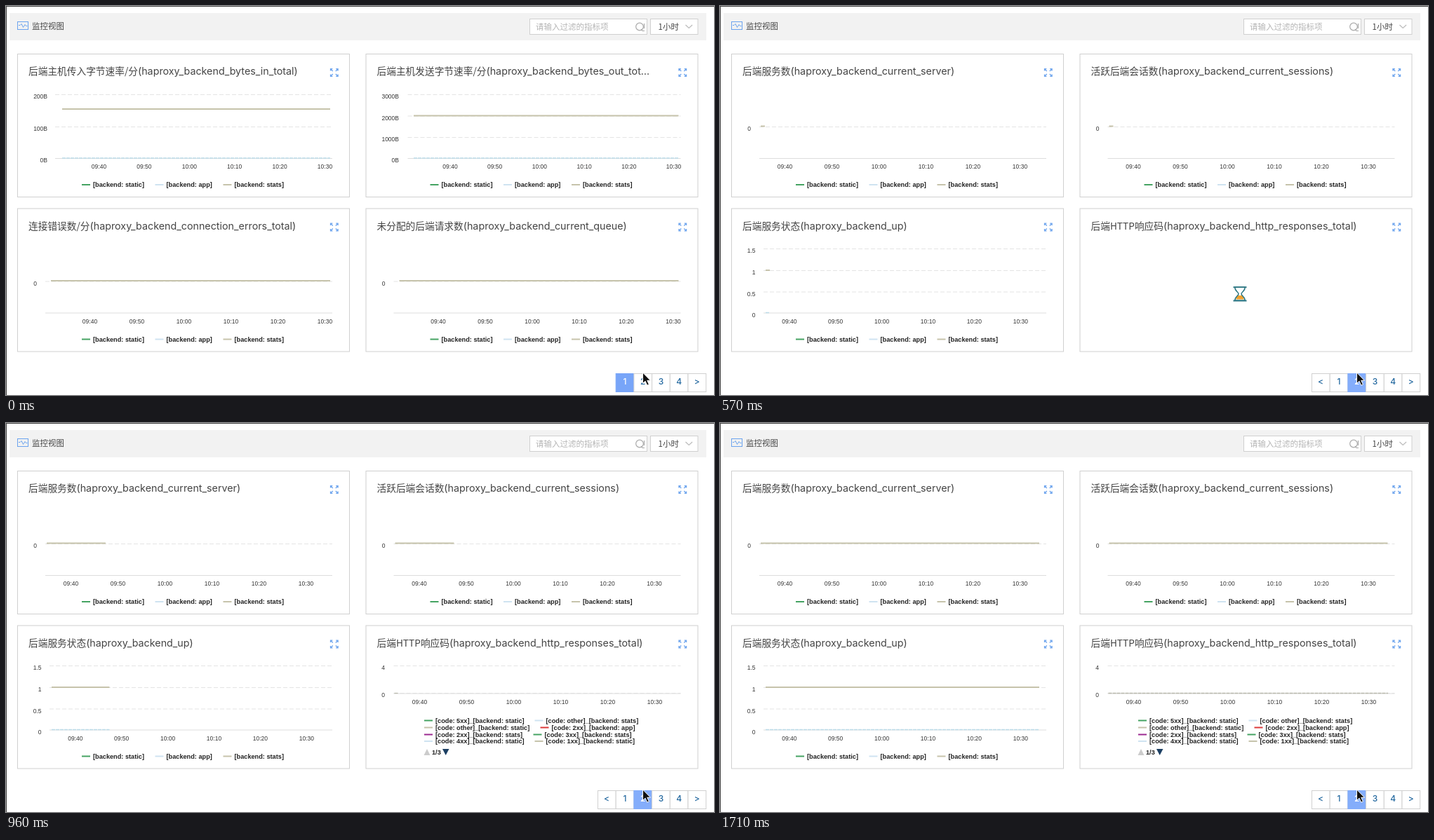
An HTML page that plays this animation: 1009 by 555 pixels, repeating every 1.83 s.

```html
<!DOCTYPE html>
<html lang="zh">
<head>
<meta charset="utf-8">
<style>
html, body { margin: 0; width: 100%; height: 100%; overflow: hidden; background: #fff; }
svg { display: block; }
text { font: 11.5px "Noto Sans CJK SC", "Noto Sans CJK", sans-serif; fill: #444; white-space: pre; }
.title { font-size: 13.7px; }
.metric { font: 14.3px Inter, sans-serif; }
.tick { font: 8.5px "Liberation Sans", Arial, sans-serif; fill: #333; }
.key { font: bold 9.2px "Liberation Sans", Arial, sans-serif; fill: #222; }
.nav { font: 500 12px Inter, sans-serif; fill: #23689f; text-anchor: middle; }
.mid { text-anchor: middle; }
.end { text-anchor: end; }
</style>
</head>
<body>
<svg id="stage" width="1009" height="555" viewBox="0 0 1009 555"></svg>
<script>
const LOOP = 1830, STEP = 30;
const GREEN = '#45a362', SKY = '#cfe3f1', TAN = '#c6c3ab', RED = '#dd3b3b', PURPLE = '#9c2a91';
const SHIFT_X = 496.5, SHIFT_Y = 220.5;

const text = (x, y, s, cls = '', extra = '') => `<text x="${x}" y="${y}" class="${cls}" ${extra}>${s}</text>`;
const line = (x1, x2, y, color, w = 1, extra = '') =>
  `<path d="M${x1} ${y}H${x2}" stroke="${color}" stroke-width="${w}" ${extra}/>`;
const box = (x, y, w, h, fill = '#fff', stroke = '#d0d0d0') =>
  `<rect x="${x}" y="${y}" width="${w}" height="${h}" fill="${fill}" stroke="${stroke}"/>`;
const key = (x, y, color, s) => line(x, x + 12, y, color, 2) + text(x + 16, y + 3.3, s, 'key');
const at = (i, s) => `<g transform="translate(${i % 2 * SHIFT_X} ${(i >> 1) * SHIFT_Y})">${s}</g>`;
const heading = s => text(32, 98, s.replace(/\(.*/, '<tspan class="metric">$&</tspan>'), 'title');

const backends = key(108, 255, GREEN, '[backend: static]') +
  key(212.5, 255, SKY, '[backend: app]') + key(309.5, 255, TAN, '[backend: stats]');

const codes = [
  [99.5, 204, GREEN, '5xx', 'static'], [257, 204, SKY, 'other', 'stats'],
  [99.5, 214, TAN, 'other', 'static'], [265, 214, RED, '2xx', 'app'],
  [99.5, 224, PURPLE, '2xx', 'stats'], [255, 224, GREEN, '3xx', 'stats'],
  [99.5, 233.5, SKY, '4xx', 'static'], [257, 233.5, TAN, '1xx', 'static']
].map(([x, y, c, code, name]) => key(x, y, c, `[code: ${code}]_[backend: ${name}]`)).join('') +
  '<path d="M99 253.5l4.5-9 4.5 9z" fill="#ccc"/>' + text(110.5, 252, '1/3', 'key') +
  '<path d="M125.5 244.5h9.5l-4.8 9z" fill="#1c3f63"/>';

// Axis, grid, series and legend of one chart, in the coordinates of the first panel
function chart(c) {
  const { left, right, ys, first, step, from, to, rows, bottom = 217.5, legend = backends } = c;
  let s = ys.map(([label, y]) => text(right, y + 5.5, label, 'tick end') +
    (y < bottom ? line(left, 465, y, '#e4e4e4', 1, 'stroke-dasharray="6 3"') : '')).join('');
  s += line(left, 465, bottom, '#ddd');
  ['09:40', '09:50', '10:00', '10:10', '10:20', '10:30'].forEach((h, i) =>
    s += text(first + i * step, bottom + 14.5, h, 'tick mid'));
  for (const [y, color, w, dash] of rows)
    s += line(from, to, y, color, w, `class="series" ${dash ? 'stroke-dasharray="5 1"' : ''}`);
  return s + legend;
}

const zeroRow = [[217, '#bcdce9', 1.5, true]];
const single = (first, from, to) => ({ left: 56, right: 44, ys: [['0', 172.5]], first, step: 67,
  from, to, rows: [[171.5, TAN, 2]] });

const pages = [[
  ['后端主机传入字节速率/分(haproxy_backend_bytes_in_total)', { left: 70, right: 59,
    ys: [['200B', 126.5], ['100B', 172.5], ['0B', 217.5]], first: 132.5, step: 64.4,
    from: 80, to: 462, rows: [...zeroRow, [147, TAN, 2]] }],
  ['后端主机发送字节速率/分(haproxy_backend_bytes_out_tot…', { left: 76, right: 63.5,
    ys: [['3000B', 126.5], ['2000B', 157], ['1000B', 187.5], ['0B', 217.5]], first: 136.5, step: 63.7,
    from: 84.5, to: 462, rows: [...zeroRow, [156.5, TAN, 2]] }],
  ['连接错误数/分(haproxy_backend_connection_errors_total)', single(119.5, 64, 462)],
  ['未分配的后端请求数(haproxy_backend_current_queue)', single(119.5, 64, 462)]
], [
  ['后端服务数(haproxy_backend_current_server)', single(92.5, 58, 455)],
  ['活跃后端会话数(haproxy_backend_current_sessions)', single(92.5, 58, 455)],
  ['后端服务状态(haproxy_backend_up)', { left: 62, right: 50.5,
    ys: [['1.5', 126], ['1', 157], ['0.5', 187.5], ['0', 217.5]], first: 98.8, step: 65.9,
    from: 65, to: 455, rows: [...zeroRow, [156.5, TAN, 2]] }],
  ['后端HTTP响应码(haproxy_backend_http_responses_total)', { left: 56, right: 43.5,
    ys: [['4', 126], ['0', 165]], first: 93, step: 67, bottom: 165.5,
    from: 57, to: 455.5, rows: [[165, '#b9b9ad', 1.3, true]], legend: codes }]
]];

const glass = 'M-7.2-9.5C-7.2-3.5-2-3-2 0S-7.2 3.5-7.2 9.5H7.2C7.2 3.5 2 3 2 0S7.2-3.5 7.2-9.5Z';
const hourglass = `<g class="wait" transform="translate(244.5 190.3)"><g class="turn">
  <g clip-path="url(#bulb)" fill="#f0a12e"><rect class="top" x="-5.5" width="11"/><rect class="low" x="-5.5" width="11"/></g>
  <path d="${glass}" fill="none" stroke="#2d7783" stroke-width="1.5"/>
  <path d="M-9.5-9.7H9.5M-9.5 9.7H9.5" stroke="#2d7783" stroke-width="1.8"/></g></g>`;

const arm = a => `<path d="M2 2L5 5M2.4 5.3H5.3V2.4" transform="rotate(${a})"/>`;
const expand = `<g transform="translate(467.8 95)" fill="none" stroke="#70a6ee" stroke-width="1.3">${[0, 90, 180, 270].map(arm).join('')}</g>`;

const page = (list, p) => `<g id="page${p}">` + list.map(([title, c], i) =>
  at(i, heading(title) + `<g class="chart">${chart(c)}</g>` + (p ? hourglass : ''))).join('') +
  (p ? box(843.5, 524.5, 25.7, 26) + text(856, 539.7, '&lt;', 'nav') : '') +
  ['1', '2', '3', '4', '&gt;'].map((s, i) => {
    const x = 869.2 + i * 25.7, on = i === p, blue = p ? '#84adfb' : '#78a5f8';
    return box(x, 524.5, 25.7, 26, on ? blue : '#fff', on ? blue : '#d0d0d0') +
      text(x + 12.8, 539.7, s, 'nav', on ? 'style="fill:#fff"' : '');
  }).join('') + '</g>';

stage.innerHTML = `<defs><clipPath id="bulb"><path d="${glass}"/></clipPath></defs>
  <path d="M0 .5H1009M.5 0V555" stroke="#444"/>
  <rect x="5" y="10" width="993" height="39" fill="#f2f2f2"/>
  <g fill="none" stroke="#6ba3ee"><rect x="16.5" y="22.5" width="15" height="11"/>
  <path d="M18 27.5h2l2-2 2.5 5 2.5-4 1.5 2h2"/></g>` +
  text(37, 32.5, '监控视图') +
  box(746.5, 18.5, 167, 22) + text(755, 33.5, '请输入过滤的指标项', '', 'style="fill:#b5b5b5"') +
  box(918.5, 18.5, 67.5, 22) + text(929.5, 33.5, '1小时') +
  `<g fill="none" stroke="#aaa" stroke-width="1.2"><circle cx="903" cy="29.5" r="5.3"/>
  <path d="M905 33l2 2.5h3M909.5 25v7"/><path d="M968.5 27l4.8 4.5 4.8-4.5" stroke="#bbb"/></g>` +
  [0, 1, 2, 3].map(i => at(i, box(16.5, 68.5, 473, 204) + expand)).join('') +
  pages.map(page).join('') +
  `<path id="arrow" d="M907.5 523v15.5l3.6-3.3 2.6 6 2.7-1.2-2.6-5.7h4.7z" fill="#111" stroke="#fff"/>
  <path id="hand" d="M907.5 535v-7.5q0-1.8 1.4-1.8t1.5 1.8v4q2.5-1.2 3 .5 2-.6 2.3.9 1.8-.2 1.8 1.6v2.5l-1.5 5.5h-7l-4.5-6q-.8-2 .8-2.2 1 0 2.2 1.4zM910.5 536v3M913 536v3M915.2 536v3" fill="#fff" stroke="#111"/>`;

const $ = s => [...document.querySelectorAll(s)];
const show = (el, on) => el.style.display = on ? '' : 'none';
const charts = $('#page1 .chart'), waits = $('#page1 .wait');
const clamp = v => Math.max(0, Math.min(1, v));
const ease = (t, start, span) => (1 - Math.cos(Math.PI * clamp((t - start) / span))) / 2;

function drawSeries(i, t) {
  const { from, to } = pages[1][i][1];
  let len = (to - from) * (i === 3 ? ease(t, 900, 810) : ease(t, 671, 950));
  if (i < 3) {
    if (i === 0 || t < 690) len = Math.max(6, len);
    else if (t < 930) len = 0;
  }
  charts[i].querySelectorAll('.series').forEach(el => {
    const y = el.getAttribute('d').match(/ ([\d.]+)H/)[1];
    el.setAttribute('d', `M${from} ${y}H${from + len}`);
  });
}

function drawGlass(el, t) {
  const phase = Math.max(0, t - 180) / 640 % 1;
  const flow = clamp(phase / .6), angle = 180 * clamp((phase - .65) / .35);
  const set = (cls, y, h) => {
    const r = el.querySelector(cls);
    r.setAttribute('y', y);
    r.setAttribute('height', h);
  };
  set('.top', -7 + 6 * flow, 6 * (1 - flow));
  set('.low', 7.7 - 5.5 * flow, 5.5 * flow);
  el.querySelector('.turn').setAttribute('transform', `rotate(${angle})`);
}

function draw(now) {
  let t = Math.floor(now % LOOP / STEP) * STEP;
  if (t > 840 && t < 930) t = 840;
  const second = t >= 120;
  show(page0, !second);
  show(page1, second);
  const pointing = second && t < 210;
  show(hand, pointing);
  show(arrow, !pointing);
  charts.forEach((el, i) => {
    const ready = t >= (i === 3 ? 930 : 540);
    show(el, ready);
    show(waits[i], !ready && t >= 180);
    drawSeries(i, t);
    drawGlass(waits[i], t);
  });
}

const start = performance.now();
function tick() {
  draw(performance.now() - start);
  requestAnimationFrame(tick);
}
tick();
</script>
</body>
</html>
```
